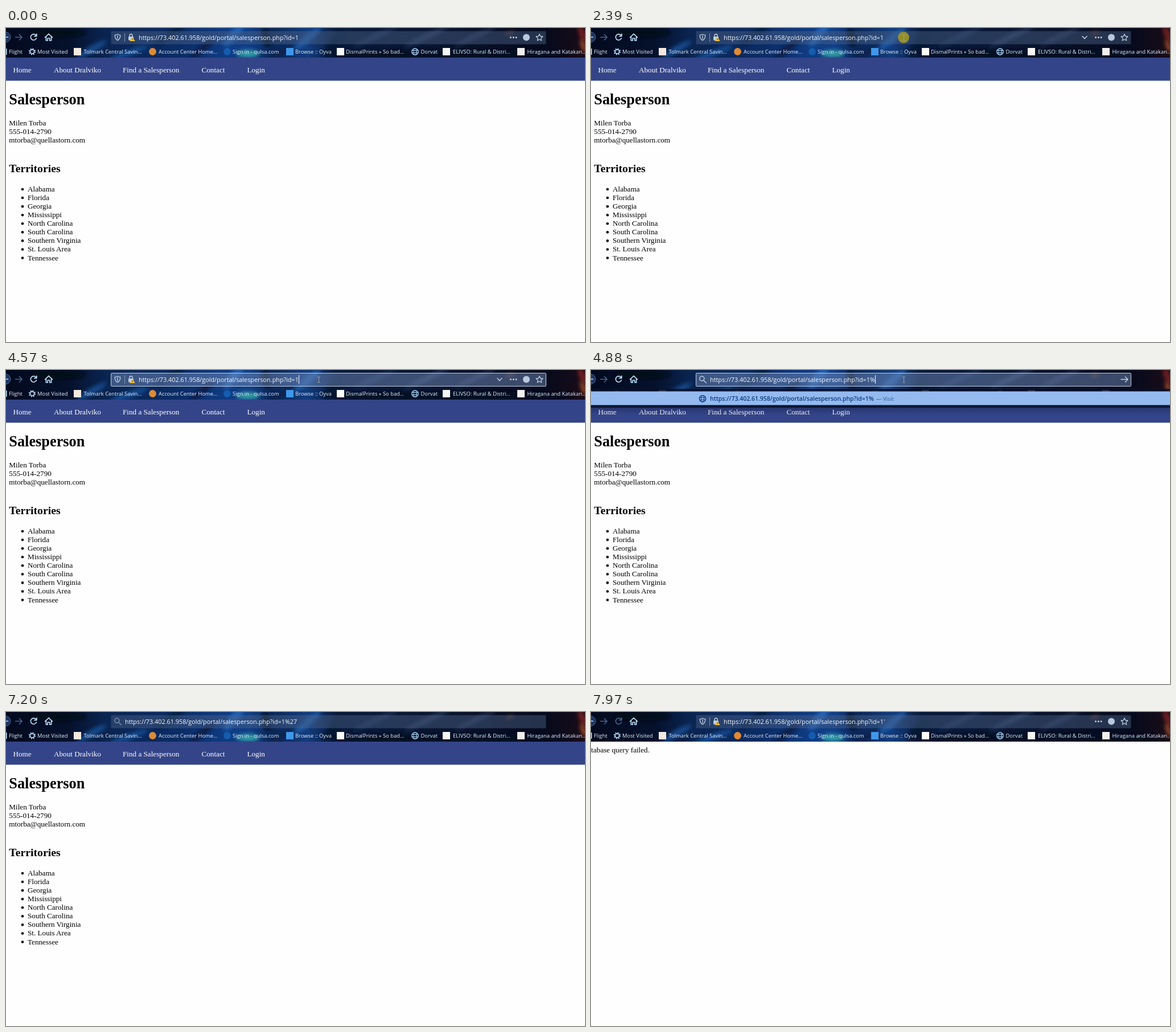
Animation of 1017x551 px, one loop 8 s. Source, as an HTML page:

```html
<!DOCTYPE html>
<html lang="en">
<head>
<meta charset="utf-8">
<title>Address bar</title>
<style>
  html, body { margin: 0; width: 100%; height: 100%; overflow: hidden; background: #fefefe; }
  svg { display: block; width: 100vw; height: 100vh; }
  text { white-space: pre; }
  .ui { font-family: "Open Sans", "Noto Sans", sans-serif; }
  .page { font-family: "Liberation Serif", "Times New Roman", serif; }
  .line { fill: none; stroke-linecap: round; stroke-linejoin: round; }
</style>
</head>
<body>
<svg id="stage" viewBox="0 0 1017 551" preserveAspectRatio="none"></svg>
<script>
const LOOP = 8000;
const BASE = "https://73.402.61.958/gold/portal/salesperson.php?id=1";
const BODY = 13.17;
const stage = document.getElementById("stage");

const text = (x, y, size, str, extra = "") =>
  `<text x="${x}" y="${y}" font-size="${size}" ${extra}>${str}</text>`;
const line = (d, color, width = 1.4, extra = "") =>
  `<path class="line" d="${d}" stroke="${color}" stroke-width="${width}" ${extra}/>`;
const rect = (x, y, w, h, fill, extra = "") =>
  `<rect x="${x}" y="${y}" width="${w}" height="${h}" fill="${fill}" ${extra}/>`;
const dot = (x, y, r, fill, extra = "") =>
  `<circle cx="${x}" cy="${y}" r="${r}" fill="${fill}" ${extra}/>`;
const group = (id, body, extra = "") => `<g id="${id}" ${extra}>${body}</g>`;
const globe = (x, y, color) =>
  `<g class="line" stroke="${color}" transform="translate(${x} ${y})">
    <circle r="5.7" stroke-width="1.3"/><ellipse rx="2.6" ry="5.7"/><path d="M-5.5-2H5.5M-5.5 2H5.5"/></g>`;

// Painted backdrop of the browser chrome: base tones from left to right, then slanted strokes
const tones = [[0, "#030a1e"], [.11, "#05112c"], [.17, "#0a2450"], [.3, "#0b2c66"], [.37, "#0f3a80"],
  [.42, "#103f88"], [.46, "#0a2656"], [.52, "#123c7e"], [.57, "#071a3c"], [.75, "#091530"], [.93, "#050a1c"], [1, "#1a0c18"]]
  .map(([at, c]) => `<stop offset="${at}" stop-color="${c}"/>`).join("");
// Strokes: x, y, half length, half width, tilt, colour
const strokes = [
  [90, 8, 50, 7, 0, "#020818"], [150, 38, 30, 6, -30, "#174a8c"], [215, 44, 36, 5, -20, "#164d94"],
  [290, 10, 34, 6, -35, "#061a40"], [345, 36, 30, 6, -40, "#071d46"], [400, 12, 26, 8, -50, "#2060b4"],
  [425, 45, 20, 6, 0, "#35a0a6"], [457, 16, 16, 6, 80, "#030a1c"], [485, 42, 24, 5, -30, "#0a2148"],
  [530, 18, 30, 6, -40, "#1f5ba8"], [575, 30, 26, 8, -50, "#051430"], [650, 14, 44, 4, -25, "#1b2f55"],
  [740, 14, 44, 4, -25, "#26375a"], [825, 14, 40, 4, -25, "#222f4e"], [780, 45, 220, 7, 0, "#040a20"],
  [885, 9, 8, 1.5, -15, "#a04a28"], [1012, 10, 14, 5, 70, "#7a2420"], [1014, 32, 12, 3, 70, "#c05a2a"]
].map(([x, y, l, w, tilt, c]) =>
  `<ellipse rx="${l}" ry="${w}" fill="${c}" transform="translate(${x} ${y}) rotate(${tilt})"/>`).join("");

// Bookmarks: text x, label, icon x, icon colour, round
const bookmarks = [
  [5, "Flight"],
  [55, "Most Visited"],
  [136.5, "Tolmark Central Savin...", 119, "#f3e9e0"],
  [268, "Account Center Home...", 251, "#dd8a35", true],
  [398, "Sign in - qulsa.com", 382, "#145cae", true],
  [508, "Browse :: Oyva", 492, "#3f97ea"],
  [597, "DismalPrints » So bad...", 581, "#fcfcfc"],
  [728.5, "Dorvat"],
  [785, "ELIVSO: Rural &amp; Distri...", 767, "#f6f6f6"],
  [915.5, "Hiragana and Katakan...", 898, "#f0f0ee"]
].map(([x, label, ix, color, round]) => {
  const icon = !color ? "" : round ? dot(ix + 6.5, 41.5, 6.4, color) : rect(ix, 35, 13, 13, color);
  return icon + text(x, 45.3, 9.4, label, 'fill="#e6f2fd"');
}).join("");

const LIGHT = "#b9dffc", GREY = "#c0cfe0", DIM = "#45648c";
const gear = dot(46, 41.5, 3.6, "none", `stroke="${LIGHT}" stroke-width="1.6"`) +
  dot(46, 41.5, 5.2, "none", `stroke="${LIGHT}" stroke-width="1.8" stroke-dasharray="2 2.08"`);

const reload = line("M53.2 13.6A5.2 5.2 0 1 0 53.4 18M53.8 10.4V14.3H49.8", "currentColor", 1.7);
const buttons =
  dot(-1, 16, 9, "#1c355f", 'stroke="#4c668f"') + line("M-3 16H3.5", LIGHT, 1.6) +
  line("M16.5 16.3H28M23.5 11.6L28.2 16.3L23.5 21", DIM, 1.6) +
  group("reload", reload) +
  group("ring", line("M46 20.9A5.3 5.3 0 1 1 51 20.9", LIGHT, 1.7)) +
  group("stop", line("M44 11.7L53 20.7M53 11.7L44 20.7", LIGHT, 1.7)) +
  line("M68.5 16.5L75 10.3L81.5 16.5M70.4 15.3V22H73.2V18H76.8V22H79.6V15.3", LIGHT, 1.7);

const siteIcons =
  line("M196 11C198 12.3 199.3 12.4 200.8 12.5C200.8 17 199.3 20 196 21.7C192.7 20 191.2 17 191.2 12.5C192.7 12.4 194 12.3 196 11ZM196 13.5V19", GREY, 1.3) +
  rect(208, 9, 1, 15, "#7f92ae") +
  rect(215, 15, 9, 6.5, GREY, 'rx="1"') + line("M217 15V13.3A2.5 2.5 0 0 1 222 13.3V15", GREY) +
  `<path d="M222 15.5L226.7 23H217.3Z" fill="#f5c23c"/>` + rect(221.6, 18, .9, 3, "#3b3120");
const searchIcon = line("M198 18.5L202.3 22.5", GREY, 1.5) +
  dot(194.8, 15, 4, "none", `stroke="${GREY}" stroke-width="1.5"`);
const actions =
  [886.5, 891.3, 896.1].map(x => dot(x, 16.5, 1.5, GREY)).join("") +
  dot(914, 16.5, 6, "#b9c9dc") +
  line("M937 10.7L938.8 14.5L942.9 15L939.9 17.9L940.6 22L937 20L933.4 22L934.1 17.9L931.1 15L935.2 14.5Z", GREY, 1.3);

const nav = [[12.5, "Home"], [84, "About Dralviko"], [205, "Find a Salesperson"], [343.5, "Contact"], [423.5, "Login"]]
  .map(([x, s]) => text(x, 78, BODY, s, 'fill="#fff"')).join("");
const details = ["Milen Torba", "555-014-2790", "mtorba@quellastorn.com"]
  .map((s, i) => text(5.3, 171 + i * 15.07, BODY, s)).join("");
const places = ["Alabama", "Florida", "Georgia", "Mississippi", "North Carolina", "South Carolina",
  "Southern Virginia", "St. Louis Area", "Tennessee"]
  .map((s, i) => dot(29, 283 + i * 15.07, 2.3, "#000") + text(38, 287 + i * 15.07, BODY, s)).join("");

stage.innerHTML = `
  <defs>
    <filter id="soft" x="-50%" y="-50%" width="200%" height="200%"><feGaussianBlur stdDeviation="3.5"/></filter>
    <clipPath id="top"><rect width="1017" height="52"/></clipPath>
    <linearGradient id="tones">${tones}</linearGradient>
    <linearGradient id="shade" x2="0" y2="1"><stop stop-color="#0a1230" stop-opacity=".3"/><stop offset="1" stop-color="#0a1230" stop-opacity="0"/></linearGradient>
  </defs>
  ${rect(0, 0, 1017, 551, "#fefefe")}
  ${group("profile", rect(0, 52, 1017, 40.5, "#334488") + nav +
    text(5.3, 134.3, BODY * 2, "Salesperson", 'font-weight="700"') + details +
    text(5.3, 253, BODY * 1.5, "Territories", 'font-weight="700"') + places, 'class="page"')}
  ${group("failed", text(-15, 71, BODY, "Database query failed."), 'class="page"')}
  <g clip-path="url(#top)" class="ui">
    ${rect(0, 0, 1017, 52, "url(#tones)")}
    <g filter="url(#soft)">${strokes}</g>
    ${buttons}${rect(0, 36, 1.5, 11, LIGHT)}${gear}${globe(718.5, 41.5, "#a9d4f7")}${bookmarks}
  </g>
  ${group("popup", rect(0, 33, 1017, 33, "#070e28", 'opacity=".86"') +
    rect(0, 37.5, 1017, 24, "#94baf0") + rect(0, 64.5, 1017, 1.2, "#0a1026") +
    rect(0, 66, 1017, 12, "url(#shade)") + globe(196, 50.3, "#0c3c80") +
    `<text x="209" y="54.3" font-size="10.45" fill="#0b3a7c"><tspan id="hint" font-weight="600"></tspan><tspan dx="4" font-size="9.8" fill="#275a98">— Visit</tspan></text>`,
    'class="ui"')}
  <g class="ui">
    <rect id="field" x="184.5" y="5.5" width="764" height="23" rx="1"/>
    ${group("site", siteIcons)}${group("search", searchIcon)}${group("actions", actions)}
    ${group("chevron", line("M863 14.5L867 18.7L871 14.5", GREY, 1.6))}
    ${group("go", line("M931 16.5H943M938.5 12L943 16.5L938.5 21", GREY, 1.5))}
    <circle id="click" cx="549" cy="16.5" fill="#a2981c"/>
    <text id="url" y="21.2" font-size="10.82" fill="#f6f9fd"></text>
    <rect id="caret" y="9" width="1" height="15" fill="#fff"/>
  </g>
  ${group("arrow", `<path d="M.5.5V11L3 8.8L4.7 12.6L6.3 11.9L4.7 8.2H7.8Z" fill="#fff" stroke="#222" stroke-width=".9"/>`)}
  ${group("beam", line("M-2-5H-.6L0-4.4L.6-5H2M0-4.4V4.4M-2 5H-.6L0 4.4L.6 5H2", "#9aa0a6", 1))}`;

const el = {};
stage.querySelectorAll("[id]").forEach(node => el[node.id] = node);
const show = (id, on) => el[id].style.display = on ? "" : "none";
const set = (id, attrs) => { for (const k in attrs) el[id].setAttribute(k, attrs[k]); };
const write = (id, str) => { if (el[id].textContent !== str) el[id].textContent = str; };

// Mouse stops: time, x, y
const path = [
  [360, 876, 516], [430, 860, 502], [510, 848.5, 492], [910, 800, 410], [980, 722, 270], [1060, 683, 191],
  [1290, 620, 150], [1370, 500, 98], [1440, 385, 60], [1520, 295, 34], [1600, 245, 15],
  [1680, 270, 10], [1760, 345, 10], [1840, 445, 13], [1910, 520, 16], [1990, 549.5, 17]
];
const blinks = [2540, 2940, 3470, 4020, 4570, 5110, 5570, 6120, 6270];
const count = (times, t) => times.filter(s => s <= t).length;
const typed = t => t < 4880 ? "" : "%27".slice(0, 1 + count([6270, 6590], t));

function render(t) {
  const editing = t >= 4880 && t < 7200;
  const loaded = t >= 7750;
  const searching = t >= 4880 && !loaded;
  const focused = t >= 2480 && t < 7200;

  show("profile", !loaded);
  show("failed", loaded);
  show("popup", editing);
  show("site", !searching);
  show("search", searching);
  show("actions", !searching);
  show("go", editing);
  show("chevron", t >= 1600 && t < 4880);
  set("search", { opacity: editing ? 1 : .55 });

  set("field", {
    fill: focused ? "rgba(112,136,180,.5)" : "rgba(76,98,134,.45)",
    stroke: focused ? "#c3d0e4" : "none"
  });
  write("url", BASE + (loaded ? "'" : typed(t)));
  const left = searching ? 209 : 233;
  set("url", { x: left });
  if (editing) write("hint", BASE + typed(Math.max(4880, t - 80)));

  show("caret", focused && count(blinks, t) % 2 === 1);
  set("caret", { x: Math.round(left + el.url.getComputedTextLength()) });

  show("click", t >= 2390 && t < 2540);
  set("click", t < 2480 ? { r: 10, opacity: .88 } : { r: 17, opacity: .25 });

  show("reload", t < 7250 || t >= 7900);
  show("ring", t >= 7250 && t < 7440);
  show("stop", t >= 7440 && t < 7900);
  el.reload.style.color = t >= 7900 ? DIM : LIGHT;

  const spot = path.filter(p => p[0] <= t).pop();
  const overField = t >= 1600;
  show("arrow", spot && !overField);
  show("beam", overField && t < 7200);
  if (spot) set(overField ? "beam" : "arrow", { transform: `translate(${spot[1]} ${spot[2]})` });
}

const start = performance.now();
function tick() {
  render((performance.now() - start) % LOOP);
  requestAnimationFrame(tick);
}
tick();
</script>
</body>
</html>
```
